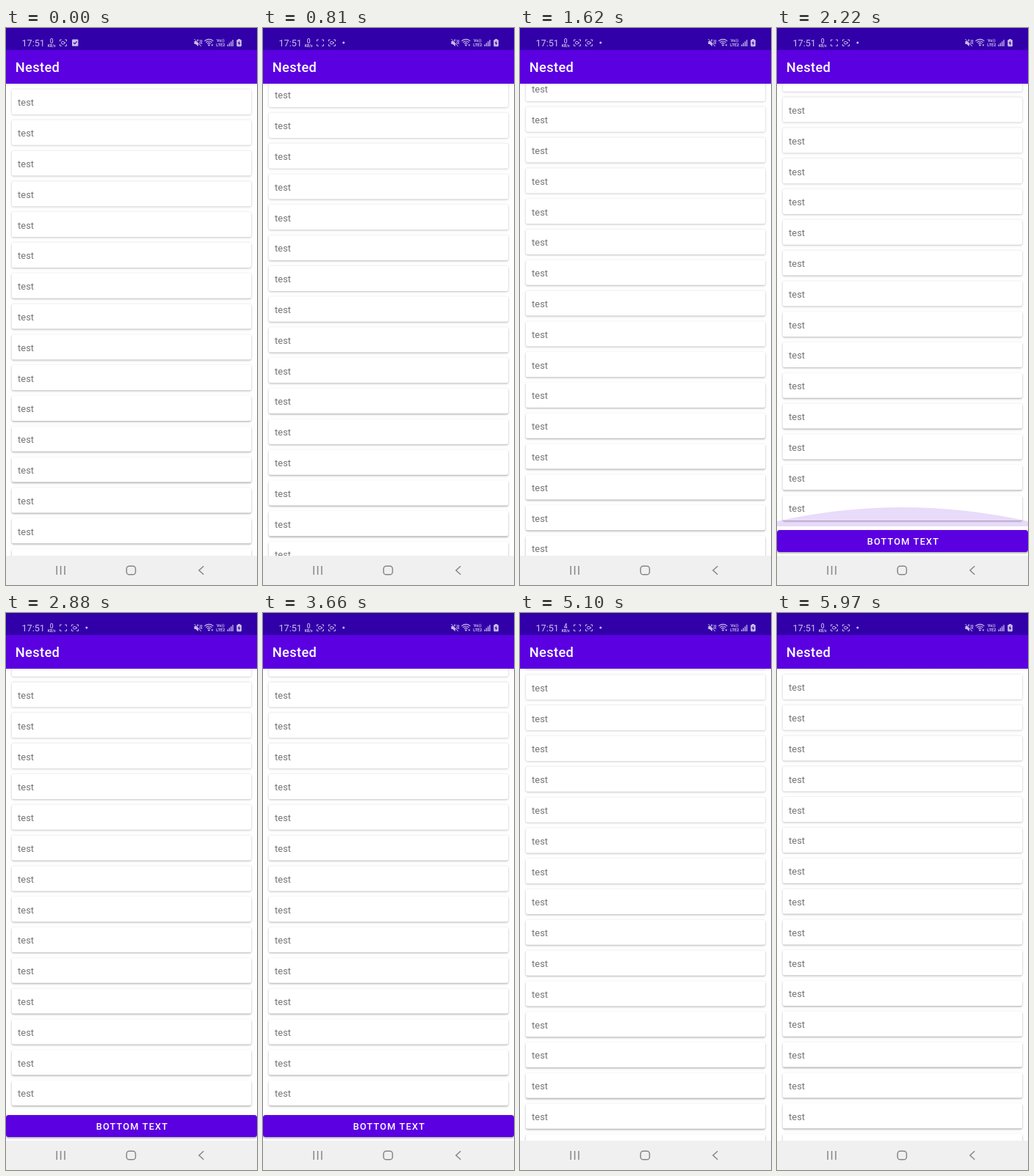
An HTML page with a canvas that plays this animation: 342x760 px, repeating every 6 s.

```html
<!DOCTYPE html>
<html lang="en">
<head>
<meta charset="utf-8">
<title>Nested list</title>
<style>
  html, body { margin: 0; width: 100%; height: 100%; overflow: hidden; background: #fff; }
  canvas { display: block; width: 342px; height: 760px; }
</style>
</head>
<body>
<canvas id="stage"></canvas>
<script>
const W = 342, H = 760, LOOP = 6000, STEP = 30;
const TOP = 76, BOTTOM = 720;
const ROWS = 30, PITCH = 41.8, END = 658.2;
const BAR = '#5a00e1', STATUS = '#3200a9', PALE = '#cbbcec', NAV = '#868686';
const FONT = 'Roboto, "Noto Sans", sans-serif';

// Scroll position through the loop: [time, offset]
const PATH = [[0, 0], [350, 0], [1230, 244.3], [1620, 394.2], [2100, END],
              [4000, END], [4650, 358.4], [5250, 0], [LOOP, 0]];

const canvas = document.getElementById('stage');
const ctx = canvas.getContext('2d');
const dpr = window.devicePixelRatio || 1;
canvas.width = W * dpr;
canvas.height = H * dpr;

const clamp = v => Math.max(0, Math.min(1, v));

function slope(i) {
  if (i <= 0 || i >= PATH.length - 1) return 0;
  const [a, b, c] = PATH.slice(i - 1, i + 2);
  const d1 = (b[1] - a[1]) / (b[0] - a[0]);
  const d2 = (c[1] - b[1]) / (c[0] - b[0]);
  return d1 * d2 <= 0 ? 0 : 2 * d1 * d2 / (d1 + d2);
}

function scrollAt(t) {
  let i = 0;
  while (i < PATH.length - 2 && t >= PATH[i + 1][0]) i++;
  const [t0, y0] = PATH[i], [t1, y1] = PATH[i + 1];
  const d = t1 - t0, u = (t - t0) / d, v = 1 - u;
  return y0 * v * v * (1 + 2 * u) + y1 * u * u * (3 - 2 * u)
    + d * u * v * (slope(i) * v - slope(i + 1) * u);
}

// Quick rise, slower fall
function glowAt(t, start) {
  const rise = clamp((t - start) / 110);
  const fall = clamp((t - start - 130) / 500);
  return Math.sin(rise * Math.PI / 2) * (1 - fall) ** 2;
}

function text(str, x, y, size, color, weight = 400, spacing = 0, align = 'left') {
  ctx.font = `${weight} ${size}px ${FONT}`;
  ctx.letterSpacing = spacing + 'px';
  ctx.textAlign = align;
  ctx.fillStyle = color;
  ctx.fillText(str, x, y);
}

function rect(x, y, w, h, color) {
  ctx.fillStyle = color;
  ctx.fillRect(x, y, w, h);
}

function box(x, y, w, h, r, color) {
  ctx.beginPath();
  ctx.roundRect(x, y, w, h, r);
  ctx.fillStyle = color;
  ctx.fill();
}

function line(color, width, ...pts) {
  ctx.beginPath();
  pts.forEach(([x, y]) => ctx.lineTo(x, y));
  ctx.strokeStyle = color;
  ctx.lineWidth = width;
  ctx.stroke();
}

function poly(color, ...pts) {
  ctx.beginPath();
  pts.forEach(([x, y]) => ctx.lineTo(x, y));
  ctx.closePath();
  ctx.fillStyle = color;
  ctx.fill();
}

// The shadow gets heavier towards the bottom of the screen
function raised(x, y, w, h, r, color) {
  const k = clamp(y / BOTTOM);
  ctx.save();
  ctx.shadowColor = `rgba(0,0,0,${0.24 + 0.1 * k})`;
  ctx.shadowBlur = 2.4 * dpr;
  ctx.shadowOffsetY = (0.3 + 1.2 * k) * dpr;
  box(x, y, w, h, r, color);
  ctx.restore();
}

function glow(edge, dir, g) {
  if (g <= 0) return;
  const side = edge + dir * 7 * g;
  ctx.beginPath();
  ctx.moveTo(0, edge);
  ctx.lineTo(0, side);
  ctx.quadraticCurveTo(W / 2, edge + dir * 45 * g, W, side);
  ctx.lineTo(W, edge);
  ctx.fillStyle = `rgba(98,0,220,${0.14 * Math.sqrt(g)})`;
  ctx.fill();
}

function list(t) {
  const s = scrollAt(t);
  ctx.save();
  ctx.beginPath();
  ctx.rect(0, TOP, W, BOTTOM - TOP);
  ctx.clip();
  for (let i = 0; i < ROWS; i++) {
    const y = 83.8 + i * PITCH - s;
    if (y < TOP - 40 || y > BOTTOM + 5) continue;
    raised(7.9, y, 326.2, 34.2, 2.5, '#fff');
    text('test', 16.1, y + 22.5, 12.9, '#757575');
  }
  const shift = END - s;
  if (shift < 45) {
    raised(0, 685 + shift, W, 30, 3.5, BAR);
    text('BOTTOM TEXT', W / 2 + 1, 705.2 + shift, 12.8, '#fff', 500, 1.14, 'center');
  }
  glow(680 + shift, -1, glowAt(t, 2100));
  glow(TOP, 1, 0.8 * glowAt(t, 5240));
  ctx.restore();
}

function frameIcon(x, filled) {
  for (const sx of [-1, 1]) for (const sy of [-1, 1]) {
    const px = x + sx * 4.5, py = 20.2 + sy * 4.2;
    line(PALE, 1, [px - sx * 2.3, py], [px, py], [px, py - sy * 2.3]);
  }
  if (!filled) return;
  ctx.beginPath();
  ctx.roundRect(x - 2.3, 18.5, 3.6, 3.4, 0.8);
  ctx.stroke();
  poly(PALE, [x + 1.5, 20.2], [x + 2.9, 18.8], [x + 2.9, 21.6]);
}

function muteIcon() {
  poly(PALE, [256.5, 18], [258.5, 18], [262, 15], [262, 25], [258.5, 22], [256.5, 22]);
  line(STATUS, 1.8, [257, 14.5], [266, 24.5]);
  line(PALE, 1, [256.5, 15], [266, 25]);
  line(PALE, 1, [264, 16], [265, 18], [264, 20], [265, 22]);
  line(PALE, 1, [266.2, 16], [267, 18], [266.2, 20], [267, 22]);
}

function wifiIcon() {
  ctx.strokeStyle = PALE;
  ctx.lineWidth = 1.1;
  for (const r of [3, 5.6, 8.2]) {
    ctx.beginPath();
    ctx.arc(276.5, 23.6, r, -Math.PI * 0.76, -Math.PI * 0.24);
    ctx.stroke();
  }
  ctx.beginPath();
  ctx.arc(276.5, 23.4, 1.2, 0, 7);
  ctx.fillStyle = PALE;
  ctx.fill();
  poly(PALE, [279.5, 22.5], [282.5, 22.5], [281, 25]);
}

function statusBar(t) {
  rect(0, 0, W, 30, STATUS);
  text('17:51', 21.4, 24.8, 12.7, PALE);
  const speed = t >= 3900 && t < 5700 ? '4' : '0';
  text(speed, 62.2, 20.6, 8.5, PALE, 500, 0, 'center');
  text('KB/s', 62.2, 25.6, 5, PALE, 700, 0, 'center');

  const phase = t % 2000;
  frameIcon(78, phase < 200 || phase >= 1300);
  if (t < 300) {
    box(90, 15.4, 8.4, 9.4, 1, PALE);
    line(STATUS, 1.2, [91.9, 19.8], [93.7, 21.6], [96.6, 18.3]);
  } else {
    frameIcon(94, true);
    box(108.3, 18.6, 3, 3, 1.5, PALE);
  }

  muteIcon();
  wifiIcon();
  text('Vo))', 292.3, 19.2, 5.6, PALE, 700, 0, 'center');
  text('LTE2', 292.3, 24.9, 5.6, PALE, 700, 0, 'center');
  for (let i = 0; i < 4; i++) rect(301.5 + i * 2.3, 22.5 - i * 2.1, 1.3, 2.5 + i * 2.1, PALE);
  box(314.3, 16, 6.6, 9.2, 1.2, PALE);
  rect(316.1, 15, 3, 1.4, PALE);
  poly(STATUS, [318.3, 17.2], [315.7, 21], [317.3, 21], [316.9, 24], [319.5, 20.2], [317.9, 20.2]);
}

function appBar() {
  const shade = ctx.createLinearGradient(0, TOP, 0, TOP + 3);
  shade.addColorStop(0, 'rgba(0,0,0,.08)');
  shade.addColorStop(1, 'rgba(0,0,0,0)');
  rect(0, TOP, W, 3, shade);
  rect(0, 29.5, W, TOP - 29.5, BAR);
  text('Nested', 12.7, 60, 18.3, '#fff', 500, 0.35);
}

function navBar() {
  rect(0, BOTTOM, W, H - BOTTOM, '#f0f0f0');
  for (const x of [69.2, 74.6, 80]) line(NAV, 1.5, [x, 734], [x, 746]);
  ctx.beginPath();
  ctx.roundRect(164.3, 734.2, 12.2, 11.6, 3.6);
  ctx.stroke();
  line(NAV, 1.5, [269.3, 734.3], [263, 740], [269.3, 745.7]);
}

function draw(now) {
  const t = Math.floor((now % LOOP) / STEP) * STEP;
  ctx.setTransform(dpr, 0, 0, dpr, 0, 0);
  rect(0, 0, W, H, '#fefefe');
  list(t);
  appBar();
  statusBar(t);
  navBar();
}

const start = performance.now();
function tick() {
  draw(performance.now() - start);
  requestAnimationFrame(tick);
}
tick();
</script>
</body>
</html>
```
